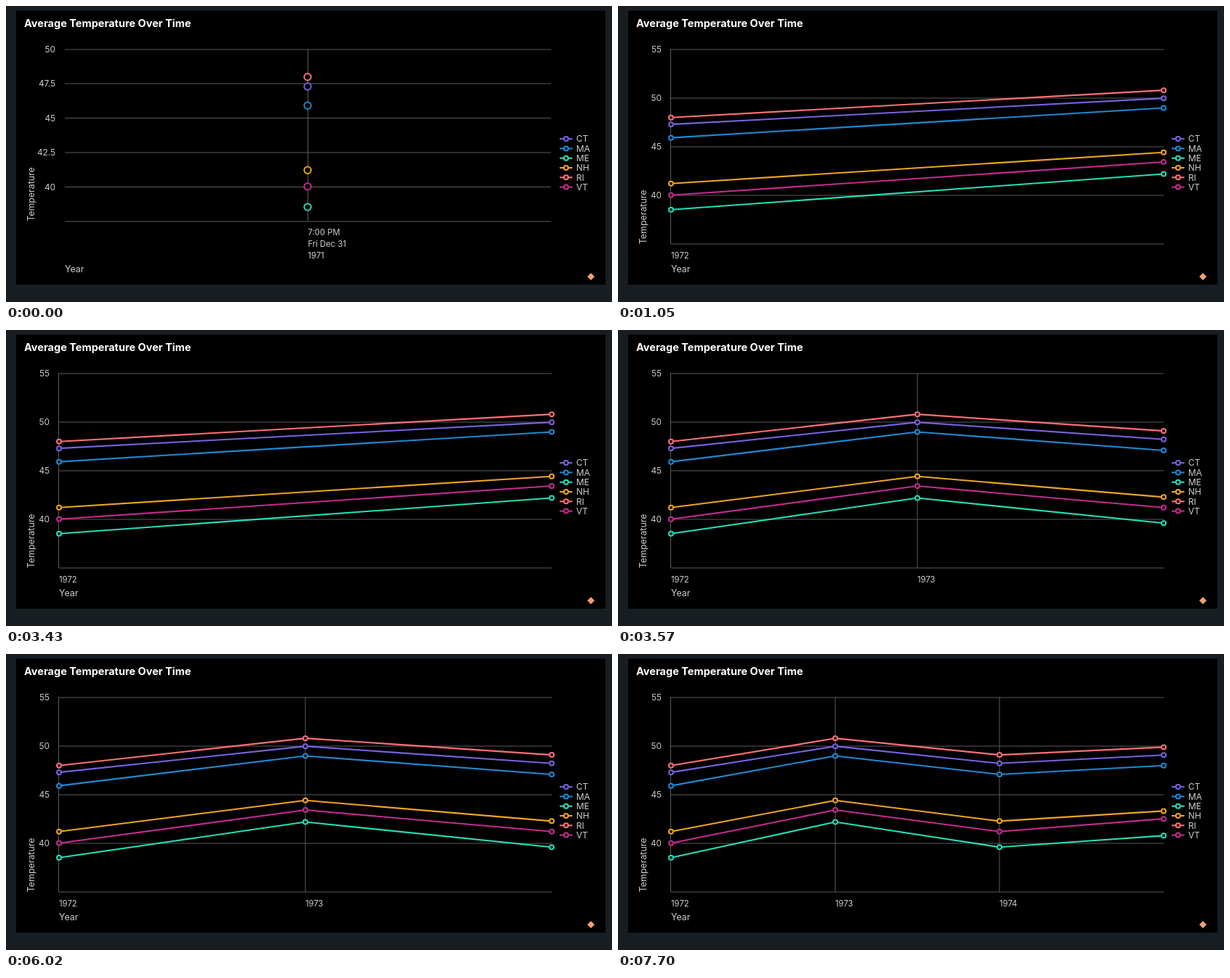
An HTML page that plays this animation: 834 px wide and 408 px high, repeating every 8000 ms.

```html
<!DOCTYPE html>
<html lang="en">
<head>
<meta charset="utf-8">
<title>Average Temperature Over Time</title>
<style>
  html, body { margin: 0; width: 100%; height: 100%; overflow: hidden; background: #171d21; }
  svg { display: block; width: 834px; height: 408px; }
  text { font: 12px Inter, "Open Sans", sans-serif; fill: #cecece; }
  .title { font-size: 14.5px; font-weight: 700; fill: #fff; }
  .axis { font-size: 12.4px; }
  .date { font-size: 11.3px; }
  .num { font-size: 11.8px; text-anchor: end; }
  .grid { stroke: #5a5a5a; stroke-width: 1; }
  .line { fill: none; stroke-width: 2.1; stroke-linejoin: round; }
  .dot { fill: #000; stroke-width: 2; }
</style>
</head>
<body>
<svg viewBox="0 0 834 408">
  <rect width="834" height="408" fill="#171d21"/>
  <rect x="14" y="6.5" width="811" height="377.5" fill="#000"/>
  <text class="title" x="25" y="28.5">Average Temperature Over Time</text>
  <g id="plot"></g>
  <g id="legend"></g>
  <path d="M805 368l5 5-5 5-5-5z" fill="#f59e70"/>
</svg>
<script>
const LOOP = 8000;
// Moments at which one more year appears in the chart.
const ARRIVALS = [910, 3570, 6230];
const FIRST_YEAR = 1972;

const SERIES = [
  { name: "CT", color: "#7b60df", temps: [47.3, 49.98, 48.22, 49.08] },
  { name: "MA", color: "#1f88d2", temps: [45.92, 48.99, 47.09, 48.0] },
  { name: "ME", color: "#28dcb8", temps: [38.54, 42.2, 39.62, 40.8] },
  { name: "NH", color: "#eda421", temps: [41.22, 44.42, 42.29, 43.33] },
  { name: "RI", color: "#ff6f78", temps: [48.0, 50.8, 49.09, 49.89] },
  { name: "VT", color: "#c22b8e", temps: [40.03, 43.43, 41.22, 42.53] }
];

const plot = document.getElementById("plot");
const legend = document.getElementById("legend");

function add(parent, tag, attrs, text) {
  const el = document.createElementNS("http://www.w3.org/2000/svg", tag);
  for (const key in attrs) el.setAttribute(key, attrs[key]);
  if (text !== undefined) el.textContent = text;
  parent.appendChild(el);
}

const rule = (x1, y1, x2, y2) => add(plot, "line", { class: "grid", x1, y1, x2, y2 });
const label = (x, y, text, cls) => add(plot, "text", { x, y, class: cls }, text);
const dot = (parent, cx, cy, r, stroke) => add(parent, "circle", { class: "dot", cx, cy, r, stroke });
const toHalf = v => Math.round(v * 2) / 2;

function scale({ top, bottom, min, max }) {
  return v => top + (max - v) / (max - min) * (bottom - top);
}

function drawAxes({ left, right, bottom, min, max, step, numX }, y) {
  for (let v = max; v >= min; v -= step) {
    const gy = toHalf(y(v));
    rule(left, gy, right, gy);
    if (v >= 40) label(numX, gy + 4.3, v, "num");
  }
  add(plot, "text", { class: "axis", transform: `translate(39 ${bottom}) rotate(-90)` }, "Temperature");
  label(left, 367, "Year", "axis");
}

function drawSingle() {
  const box = { left: 81, right: 750, top: 59.8, bottom: 296.8, min: 37.5, max: 50, step: 2.5, numX: 68 };
  const y = scale(box);
  drawAxes(box, y);
  rule(415.5, 59, 415.5, 296);
  ["7:00 PM", "Fri Dec 31", "1971"].forEach((s, i) => label(415.5, 316 + i * 15.8, s, "date"));
  for (const s of SERIES) dot(plot, 415.1, y(s.temps[0]), 4.7, s.color);
}

function drawLines(count) {
  const box = { left: 73, right: 751, top: 59.8, bottom: 328.2, min: 35, max: 55, step: 5, numX: 60 };
  const y = scale(box);
  const x = i => box.left + i * (box.right - box.left) / (count - 1);
  drawAxes(box, y);
  for (let i = 0; i < count - 1; i++) {
    const gx = i ? x(i) : 72.5;
    rule(gx, 59, gx, 328);
    label(x(i), 348, FIRST_YEAR + i, "date");
  }
  for (const s of SERIES) {
    const pts = s.temps.slice(0, count).map((v, i) => [x(i), y(v)]);
    add(plot, "polyline", { class: "line", points: pts.join(" "), stroke: s.color });
    for (const [px, py] of pts) dot(plot, px, py, 3, s.color);
  }
}

function drawLegend() {
  SERIES.forEach((s, i) => {
    const y = 183.1 + i * 13.3;
    add(legend, "path", { class: "line", d: `M762 ${y}h17.5`, stroke: s.color });
    dot(legend, 770.8, y, 3, s.color);
    add(legend, "text", { x: 784.7, y: y + 4.3 }, s.name);
  });
}

let shown = 0;
function render(ms) {
  const t = ms % LOOP;
  const count = 1 + ARRIVALS.filter(a => t >= a).length;
  if (count === shown) return;
  shown = count;
  plot.replaceChildren();
  if (count === 1) drawSingle();
  else drawLines(count);
}

drawLegend();
render(0);
const start = performance.now();
function tick() {
  render(performance.now() - start);
  requestAnimationFrame(tick);
}
requestAnimationFrame(tick);
</script>
</body>
</html>
```
